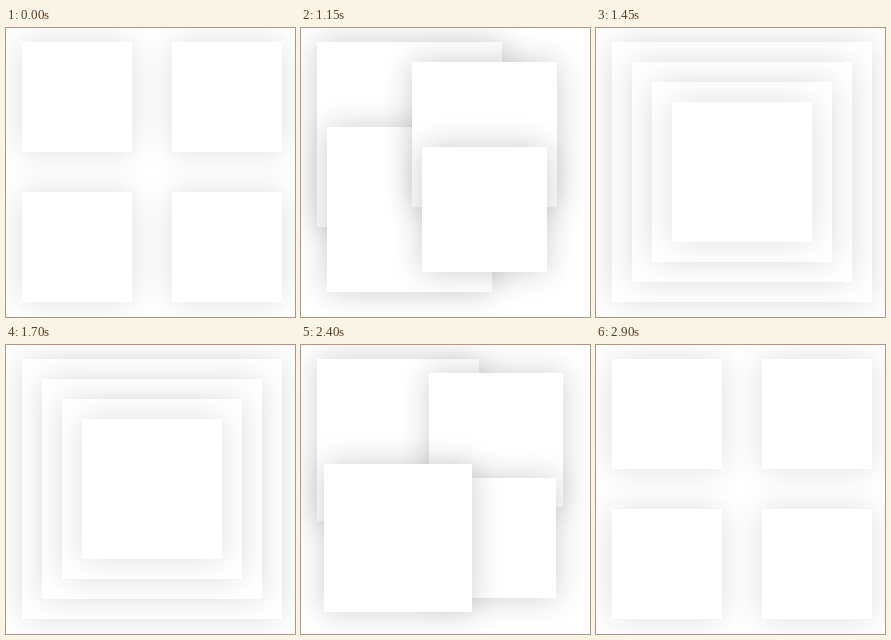
Animation of 289x289 px, one loop 3500 ms. Source, as an HTML page:

```html
<!DOCTYPE html>
<html lang="en">
<head>
<meta charset="utf-8">
<title>Stacking squares</title>
<style>
  html, body { margin: 0; width: 100%; height: 100%; overflow: hidden; background: #fff; }
  div { position: absolute; background: #fff; }
</style>
</head>
<body>
<script>
const LOOP = 3500, STEP = 50;

// Grid and stacked poses as [x, y, size]; z is the order while stacking.
const squares = [
  { grid: [16, 14, 110], stack: [16, 14, 260], z: 0 },
  { grid: [166, 14, 110], stack: [56, 54, 180], z: 2 },
  { grid: [166, 164, 110], stack: [76, 74, 140], z: 3 },
  { grid: [16, 164, 110], stack: [36, 34, 220], z: 1 },
].map(s => ({ ...s, el: document.body.appendChild(document.createElement('div')) }));

const cubic = (s, a, b) => 3 * (1 - s) ** 2 * s * a + 3 * (1 - s) * s * s * b + s ** 3;

function bezier(x, x1, y1, x2, y2) {
  if (x <= 0) return 0;
  if (x >= 1) return 1;
  let lo = 0, hi = 1;
  for (let i = 0; i < 24; i++) {
    const mid = (lo + hi) / 2;
    if (cubic(mid, x1, x2) < x) lo = mid; else hi = mid;
  }
  return cubic(lo, y1, y2);
}

const gather = t => bezier((t - 1010) / 475, .25, .1, .25, 1);
const spread = t => bezier((t - 2200) / 600, .25, .31, .25, 1);

function draw(now) {
  const t = Math.floor(now % LOOP / STEP) * STEP;
  const back = spread(t), p = gather(t) - back;
  // The shadow is deeper while the squares travel.
  const moving = Math.min(1, 4 * p * (1 - p));
  const alpha = .13 + .07 * moving;
  for (const { el, grid, stack, z } of squares) {
    const [x, y, size] = grid.map((g, i) => g + (stack[i] - g) * p);
    Object.assign(el.style, {
      left: x + 'px', top: y + 'px', width: size + 'px', height: size + 'px',
      zIndex: back ? 0 : z,
      boxShadow: `0 0 30px rgba(0,0,0,${alpha})`,
    });
  }
}

const start = performance.now();
function frame() {
  draw(performance.now() - start);
  requestAnimationFrame(frame);
}
frame();
</script>
</body>
</html>
```
